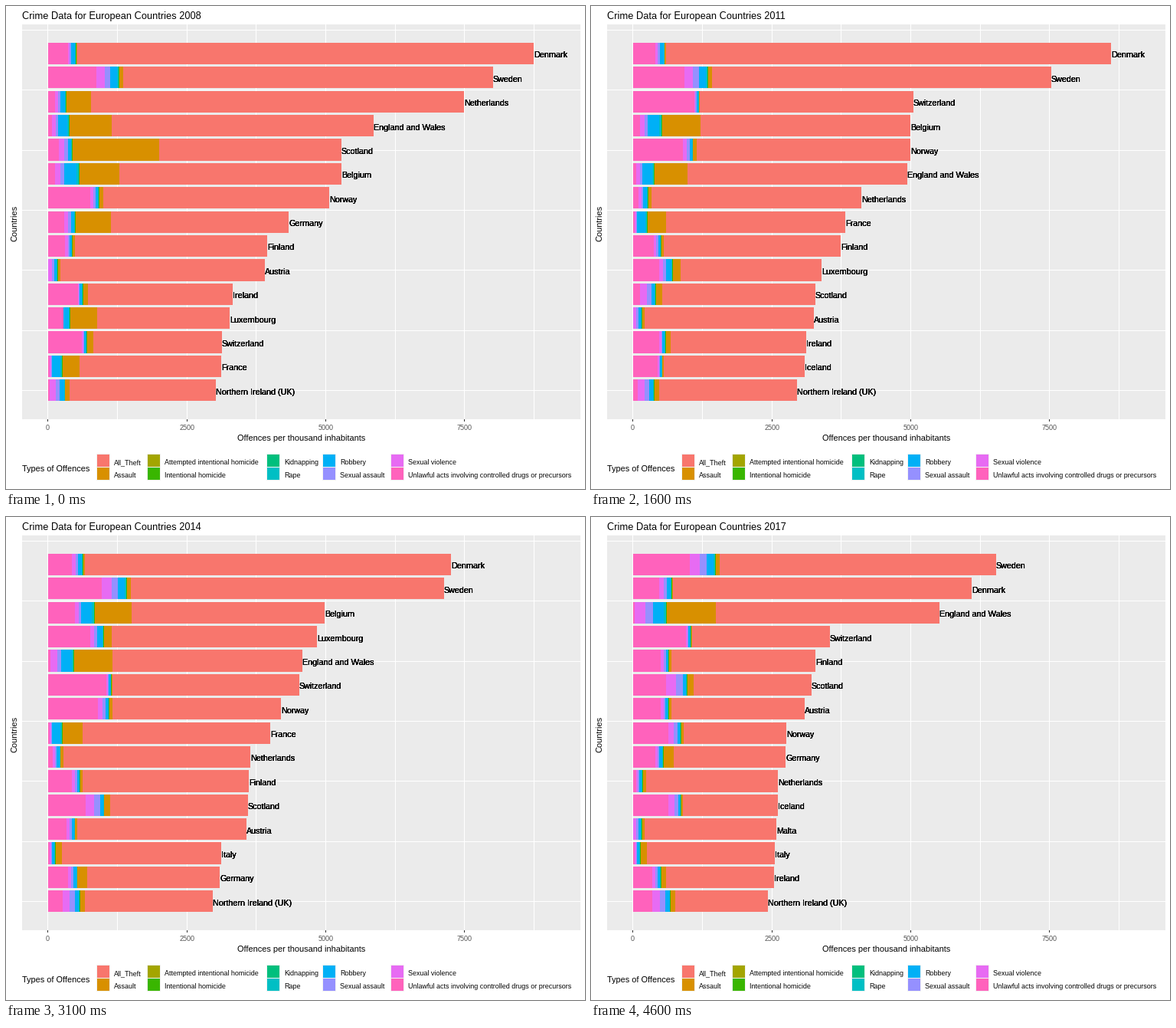
These frames come from a looping animation (756 by 630 pixels, 10 s). A matplotlib script:

```python
import matplotlib.pyplot as plt
import numpy as np
from matplotlib.animation import FuncAnimation
from matplotlib.patches import Rectangle

plt.rcParams.update({
    "font.family": "Liberation Sans",
    "text.hinting": "native",
    "toolbar": "None",
})

W, H, DPI = 756, 630, 72
FIRST, LAST = 2008, 2017
ROWS = 15
ZERO, STEP = 54.9, 90.65         # x axis: zero and 1250 offences, in px
TOP, PITCH = 31.1, 31.38         # y axis: rank zero and rank spacing, in px
LEFT = 55                        # where bars start
OVERPRINT = 4                    # stacked labels look bold

RED, ORANGE, OLIVE, LEAF, MINT, TEAL, BLUE, LILAC, VIOLET, PINK = (
    "#F8766D", "#D89000", "#A3A500", "#39B600", "#00BF7D",
    "#00BFC4", "#00B0F6", "#9590FF", "#E76BF3", "#FF62BC")
STACK = (PINK, VIOLET, LILAC, BLUE, TEAL, LEAF, ORANGE, RED)


def at(year, value):
    """Constant, linear (start, end) trend, or {year: value} key points."""
    if isinstance(value, dict):
        return np.interp(year - 2000, list(value), list(value.values()))
    if isinstance(value, tuple):
        return np.interp(year, (FIRST, LAST), value)
    return value


class Country:
    """Bar lengths in px; every quantity follows its own trend."""

    def __init__(self, name, total, drugs, sexual, robbery, assault):
        self.name, self.total = name, total
        self.parts = drugs, sexual, robbery, assault

    def length(self, year):
        return at(year, self.total)

    def edges(self, year):
        drugs, sexual, robbery, assault = (at(year, p) for p in self.parts)
        widths = (drugs, 0.6 * sexual, 0.4 * sexual,
                  0.85 * robbery, 0.15 * robbery, 0.7, assault)
        sums = np.append(np.cumsum(widths), self.length(year))
        return LEFT + np.round(sums)


countries = [
    Country("Denmark", {8: 634, 9: 662, 10: 630, 11: 624, 14: 526, 15: 472,
                        17: 442}, (26, 34), (4, 10), 6, 1.5),
    Country("Sweden", {8: 581, 10: 549, 12: 542, 15: 505, 17: 474},
            (63, 74), (18, 22), 11, 5),
    Country("England and Wales", {8: 425, 10: 381, 12: 336, 14: 332, 15: 342,
                                  17: 400},
            (5, 2), {12: 8, 17: 24}, (14, 17), {8: 55, 12: 40, 17: 64}),
    Country("Scotland", {8: 383, 9: 270, 12: 222, 14: 261, 15: 241, 17: 233},
            {8: 14, 12: 7, 14: 49, 17: 43}, (12, 22), 5, {8: 113, 9: 8}),
    Country("Belgium", {8: 383, 9: 389, 10: 363, 14: 361, 15: 332, 17: 150},
            {12: 9, 14: 35}, (12, 6), (19, 16), (52, 46)),
    Country("Norway", {8: 367, 9: 383, 12: 351, 14: 304, 15: 243, 17: 200},
            {8: 55, 10: 65, 14: 65, 17: 46}, (7, 12), 4, (5, 3)),
    Country("Germany", {8: 314, 9: 200, 12: 217, 14: 224, 15: 229, 17: 199},
            (21, 29), (9, 5), 5, {8: 46, 12: 13}),
    Country("Finland", {8: 286, 9: 289, 12: 262, 14: 262, 17: 238},
            (22, 36), (6, 7), 3, 3),
    Country("Austria", {9: 283, 10: 239, 12: 232, 14: 259, 15: 246, 17: 224},
            {12: 0, 14: 24, 17: 36}, (8, 6), 4, 3),
    Country("Netherlands", {8: 543, 9: 540, 10: 297, 12: 300, 15: 246,
                            17: 189},
            (9, 4), (7, 4), (7, 4), {9: 32, 10: 4}),
    Country("Ireland", {8: 241, 10: 231, 12: 220, 14: 195, 17: 184},
            (39, 25), (2, 7), 4, 6),
    Country("Luxembourg", {8: 237, 9: 263, 10: 226, 12: 267, 14: 351, 15: 312,
                           17: 120},
            {8: 20, 9: 32, 12: 35, 14: 55}, {8: 0, 9: 9}, 8,
            {9: 35, 10: 10}),
    Country("Switzerland", {8: 227, 9: 355, 10: 339, 12: 394, 14: 328,
                            15: 298, 17: 257},
            {8: 44, 9: 82, 15: 75, 17: 69}, 3, 3, {8: 8, 9: 1}),
    Country("France", {8: 226, 9: 279, 10: 257, 11: 277, 12: 263, 14: 290,
                       15: 284, 16: 0}, 2, 3, 13, (22, 28)),
    Country("Northern Ireland (UK)", {8: 219, 9: 239, 10: 213, 15: 216,
                                      17: 176},
            {10: 2, 14: 19, 17: 25}, (13, 17), 6.5, 6),
    Country("Iceland", {8: 200, 9: 275, 10: 248, 12: 200, 17: 189},
            (25, 46), {10: 1, 17: 13}, 3, 2),
    Country("Malta", {10: 200, 12: 217, 14: 200, 17: 187}, 0, 7, 4, 3),
    Country("Italy", {12: 200, 14: 226, 15: 211, 17: 185}, 2, 3, 4, 8),
]


def ranking(year):
    return sorted(countries, key=lambda c: -c.length(year))[:ROWS]


fig = plt.figure(figsize=(W / DPI, H / DPI), dpi=DPI, facecolor="white")
ax = fig.add_axes([0, 0, 1, 1])
ax.set(xlim=(0, W), ylim=(H, 0))
ax.axis("off")


def box(x0, y0, x1, y1, color, z=1):
    rect = Rectangle((x0, y0), x1 - x0, y1 - y0, fc=color, lw=0,
                     antialiased=False, zorder=z)
    return ax.add_patch(rect)


def text(x, y, s, px, color="black", **kw):
    kw.setdefault("va", "baseline")
    return ax.text(x, y, s, fontsize=px, color=color, zorder=5, **kw)


# Panel, grid and axes
panel = box(21, 24, 750, 539, "#EBEBEB")
for i in range(8):
    x = int(ZERO + STEP * i)
    box(x, 24, x + 1, 539, "white", 2)
    if i % 2 == 0:
        box(x, 539, x + 1, 542, "#333333", 2)
        text(x + 0.5, 553, str(1250 * i), 9, "#4D4D4D", ha="center")
for i in range(7):
    y = int(TOP + 2.5 * PITCH * i)
    box(21, y, 750, y + 1, "white", 2)
text(386, 567, "Offences per thousand inhabitants", 11, ha="center")
text(11, 283, "Countries", 11, rotation=90, ha="center", va="center")
title = text(21, 17, "", 12.9)

# Legend
text(21, 607, "Types of Offences", 11)
legend = (
    (119, (RED, "All_Theft"), (ORANGE, "Assault")),
    (185, (OLIVE, "Attempted intentional homicide"),
     (LEAF, "Intentional homicide")),
    (341, (MINT, "Kidnapping"), (TEAL, "Rape")),
    (414, (BLUE, "Robbery"), (LILAC, "Sexual assault")),
    (503, (VIOLET, "Sexual violence"),
     (PINK, "Unlawful acts involving controlled drugs or precursors")),
)
for x, *entries in legend:
    for y, (color, label) in zip((585, 602), entries):
        box(x - 1, y - 1, x + 17, y + 17, "#F2F2F2", 0)
        box(x, y, x + 16, y + 16, color)
        text(x + 22, y + 13, label, 9)

# Reusable bars and labels, one set per rank
bars, labels = [], []
half = 0.45 * PITCH
for rank in range(1, ROWS + 1):
    y = TOP + PITCH * rank
    top, bottom = int(y - half), int(y + half)
    bars.append([box(LEFT, top, LEFT, bottom, c, 3) for c in STACK])
    stack = [text(0, round(y + 4.9), "", 10.8) for _ in range(OVERPRINT)]
    for t in stack:
        t.set_clip_path(panel)
    labels.append(stack)


def draw(i):
    # The title follows the bars one step later
    bar_year = min(FIRST + i // 5, LAST)
    title_year = min(FIRST + max(i - 1, 0) // 5, LAST)
    title.set_text(f"Crime Data for European Countries {title_year}")
    for segs, stack, country in zip(bars, labels, ranking(bar_year)):
        left = LEFT
        edges = country.edges(bar_year)
        for seg, right in zip(segs, edges):
            seg.set_x(left)
            seg.set_width(right - left)
            left = right
        for t in stack:
            t.set_x(edges[-1])
            t.set_text(country.name)
    return []


anim = FuncAnimation(fig, draw, frames=100, interval=100, repeat=True,
                     repeat_delay=0, blit=False, cache_frame_data=False)
plt.show()
```
